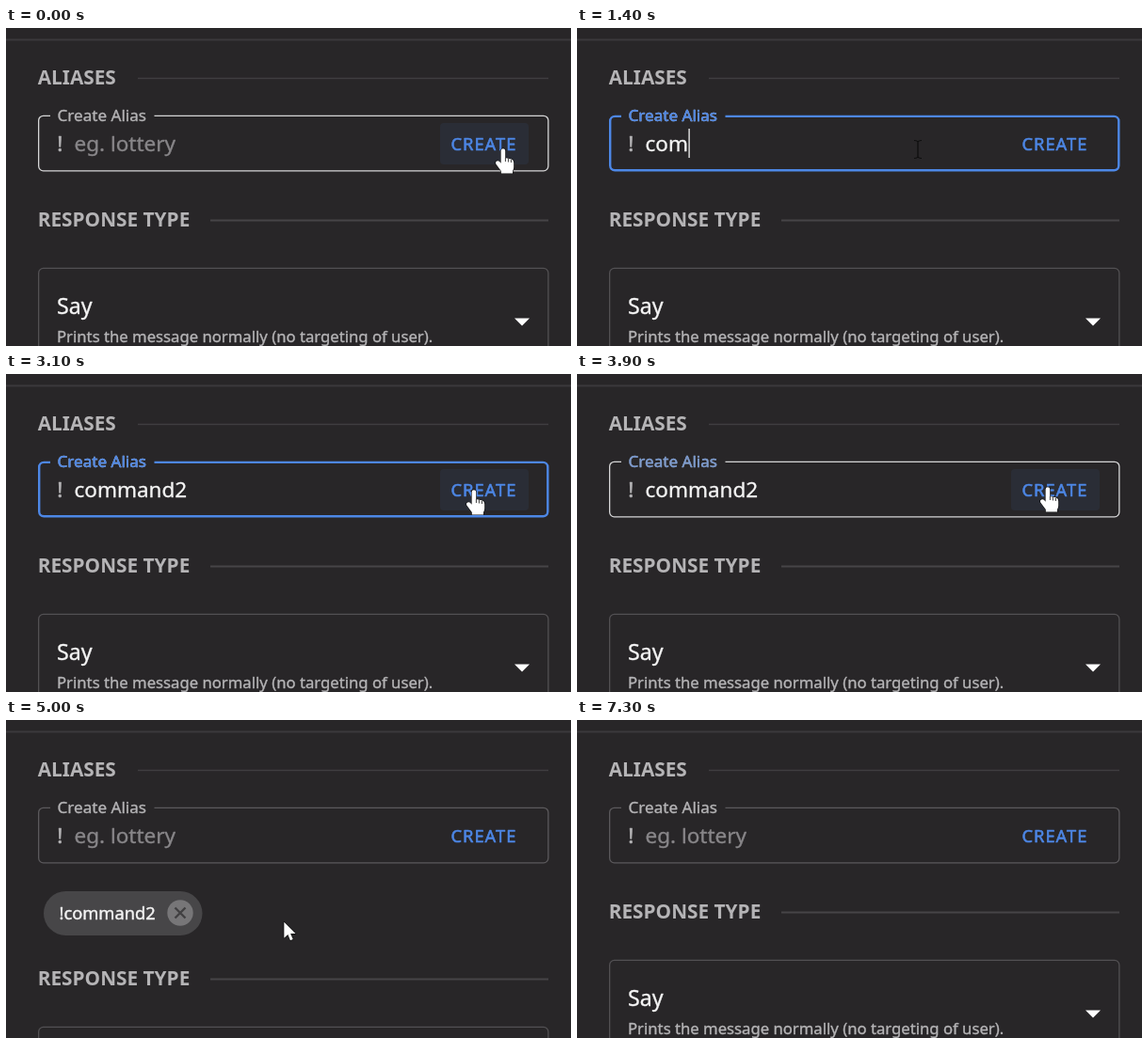
An HTML page with a canvas for the animation above (8.3 s loop, 600 by 338 pixels).

```html
<!DOCTYPE html>
<html lang="en">
<head>
<meta charset="utf-8">
<title>Create alias</title>
<style>
  html, body { margin: 0; width: 100%; height: 100%; overflow: hidden; background: #282628; }
  canvas { display: block; }
</style>
</head>
<body>
<canvas id="stage" width="600" height="338"></canvas>
<script>
const ctx = document.getElementById('stage').getContext('2d');
const LOOP = 8300, STEP = 100;
const BG = '#282628', GREY = '#b5b4b6', BLUE = '#4d87e6', WHITE = '#f4f4f4';

const FOCUS = 500, BLUR = 3800, CREATED = 4000, DELETED = 6400, GONE = 7300;
const CHIP_SHIFT = 71;

// Pointer path: time, x, y
const PATH = [
  [0, 528, 129], [100, 522, 131], [200, 488, 134], [300, 430, 134], [400, 382, 131],
  [500, 364, 129], [600, 362, 129], [2500, 362, 129], [2700, 385, 129], [2900, 460, 128],
  [3100, 497, 124], [3200, 500, 121], [4000, 500, 121], [4300, 496, 127], [4400, 491, 135],
  [4500, 479, 160], [4600, 460, 182], [4800, 398, 212], [5100, 244, 216], [5400, 195, 202],
  [5900, 195, 202], [6100, 197, 202], [7100, 197, 202], [7200, 17, 162]
];

const HAND = new Path2D('M-2.4 1.5a2.3 2.3 0 0 1 4.6 0V9l6.6 1.5q2.4.8 2.4 3.4v5q0 2-1.2 4v2.6H-2.2V23l-5.2-7q-1.5-2.6.6-3.6 2-.6 3.4 1.2l1 1.2z');
const FINGERS = new Path2D('M2.4 9v4M5.4 10v3.5M8.4 11v3');
const ARROW = new Path2D('M0 0V17l4-3.6 2.6 6.2 2.8-1.2-2.6-6h5.4z');
const BEAM = new Path2D('M-4-9.5q3 0 4 1.5q1-1.5 4-1.5M0-8V8M-4 9.5q3 0 4-1.5q1 1.5 4 1.5');

const clamp = v => Math.min(1, Math.max(0, v));
const inside = (p, x0, y0, x1, y1) => p.x >= x0 && p.x <= x1 && p.y >= y0 && p.y <= y1;

function pointerAt(t) {
  const i = PATH.findIndex(k => k[0] > t);
  if (i < 0) return { x: PATH.at(-1)[1], y: PATH.at(-1)[2] };
  const [t0, x0, y0] = PATH[i - 1], [t1, x1, y1] = PATH[i];
  const k = (t - t0) / (t1 - t0);
  return { x: x0 + (x1 - x0) * k, y: y0 + (y1 - y0) * k };
}

// A hairline stroke gives regular text a slightly heavier weight.
function text(str, x, y, size, color, { weight = 400, spacing = 0, heft = 0.35 } = {}) {
  ctx.font = `${weight} ${size}px "Noto Sans", sans-serif`;
  ctx.letterSpacing = spacing + 'px';
  ctx.fillStyle = ctx.strokeStyle = color;
  ctx.lineWidth = heft;
  ctx.lineJoin = 'round';
  ctx.fillText(str, x, y);
  if (heft) ctx.strokeText(str, x, y);
}

function heading(str, y) {
  text(str, 33.7, y, 20.8, GREY, { weight: 700, heft: 0 });
}

function rule(x0, y, x1, color, width) {
  ctx.fillStyle = color;
  ctx.fillRect(x0, y - width / 2, x1 - x0, width);
}

function roundBox(x, y, w, h, r) {
  ctx.beginPath();
  ctx.roundRect(x, y, w, h, r);
}

// The line lies inside the box, so a wider one grows inwards.
function outline(y, h, color, width) {
  roundBox(34 + width / 2, y + width / 2, 542.5 - width, h - width, 5);
  ctx.strokeStyle = color;
  ctx.lineWidth = width;
  ctx.stroke();
}

function drawInput(t, pointer) {
  const focused = t >= FOCUS && t < BLUR;
  const hovered = t < GONE && inside(pointer, 34, 93, 576, 152);
  const border = focused ? BLUE : hovered ? '#d6d6d7' : '#5b595c';
  outline(92.7, 59.8, border, focused ? 2.4 : 1.3);

  ctx.fillStyle = BG;
  ctx.fillRect(47, 90, 110.5, 8);
  text('Create Alias', 54.5, 99, 17.1, GREY);
  ctx.globalAlpha = t < BLUR ? clamp((t - FOCUS + 100) / 200) : clamp((CREATED - t) / 200);
  text('Create Alias', 54.5, 99, 17.1, BLUE);
  ctx.globalAlpha = 1;

  if (t < GONE && inside(pointer, 461, 101, 555, 145)) {
    roundBox(461, 101, 94, 44, 4);
    ctx.fillStyle = `rgba(77, 135, 230, ${t >= CREATED ? 0.12 : 0.07})`;
    ctx.fill();
  }
  text('CREATE', 472.5, 130, 18.3, BLUE, { spacing: 1, heft: 0.6 });
  text('!', 54.2, 131, 22.5, GREY, { heft: 0.6 });

  let typed = '';
  if (t >= 1200 && t < CREATED) {
    typed = t >= 2200 ? 'command2' : 'command'.slice(0, (t - 1100) / 100);
  }
  if (typed) text(typed, 72.5, 131, 22.5, WHITE);
  else text('eg. lottery', 72.5, 131, 22.5, '#888689');

  const blinkedOff = (t >= 1000 && t < 1200) || (t >= 2700 && t < 3200);
  if (focused && !blinkedOff) {
    ctx.fillStyle = WHITE;
    ctx.fillRect(73 + ctx.measureText(typed).width, 107, 1.3, 31);
  }
}

function drawChip(hovered) {
  roundBox(40, 182, 168.5, 47, 23.5);
  ctx.fillStyle = '#474648';
  ctx.fill();
  text('!command2', 56.5, 212, 18.3, WHITE, { heft: 0.45 });
  ctx.beginPath();
  ctx.arc(185, 205, 13.7, 0, 7);
  ctx.fillStyle = hovered ? '#979698' : '#777678';
  ctx.fill();
  ctx.beginPath();
  for (const s of [-1, 1]) {
    ctx.moveTo(185 - 5.5, 205 - 5.5 * s);
    ctx.lineTo(185 + 5.5, 205 + 5.5 * s);
  }
  ctx.strokeStyle = '#414042';
  ctx.lineWidth = 2.4;
  ctx.stroke();
}

function drawResponse(shift) {
  ctx.save();
  ctx.translate(0, shift);
  heading('RESPONSE TYPE', 211);
  rule(217, 204.5, 576, '#464447', 2);
  outline(254.8, 120, '#525053', 1.3);
  text('Say', 54, 304, 23.2, WHITE);
  text('Prints the message normally (no targeting of user).', 54, 334, 16.7, GREY);
  ctx.fillStyle = '#fff';
  ctx.fill(new Path2D('M540 308.5h16l-8 8z'));
  ctx.restore();
}

function drawPointer(p, kind) {
  ctx.save();
  ctx.translate(p.x, p.y);
  ctx.lineWidth = 1.2;
  ctx.strokeStyle = '#0d0d0d';
  if (kind === 'beam') {
    ctx.stroke(BEAM);
  } else {
    const shape = kind === 'hand' ? HAND : ARROW;
    ctx.fillStyle = '#fff';
    ctx.stroke(shape);
    ctx.fill(shape);
    ctx.lineWidth = 0.8;
    if (kind === 'hand') ctx.stroke(FINGERS);
  }
  ctx.restore();
}

function draw(t) {
  const pointer = pointerAt(t);
  const chip = t >= CREATED && t < DELETED;
  const overDelete = chip && Math.hypot(pointer.x - 185, pointer.y - 205) < 14;
  const overButton = inside(pointer, 461, 101, 555, 145);

  ctx.fillStyle = BG;
  ctx.fillRect(0, 0, 600, 338);
  rule(0, 12.5, 600, '#3b393c', 2);
  heading('ALIASES', 60);
  rule(140, 53.5, 576, '#403e41', 1.4);

  drawInput(t, pointer);
  if (chip) drawChip(overDelete);
  drawResponse(chip ? CHIP_SHIFT : 0);

  if (t < GONE) {
    const overInput = inside(pointer, 34, 93, 576, 152);
    drawPointer(pointer, overButton || overDelete ? 'hand' : overInput ? 'beam' : 'arrow');
  }
}

const start = performance.now();
function tick() {
  const t = (performance.now() - start) % LOOP;
  draw(Math.floor(t / STEP) * STEP);
  requestAnimationFrame(tick);
}
tick();
</script>
</body>
</html>
```
